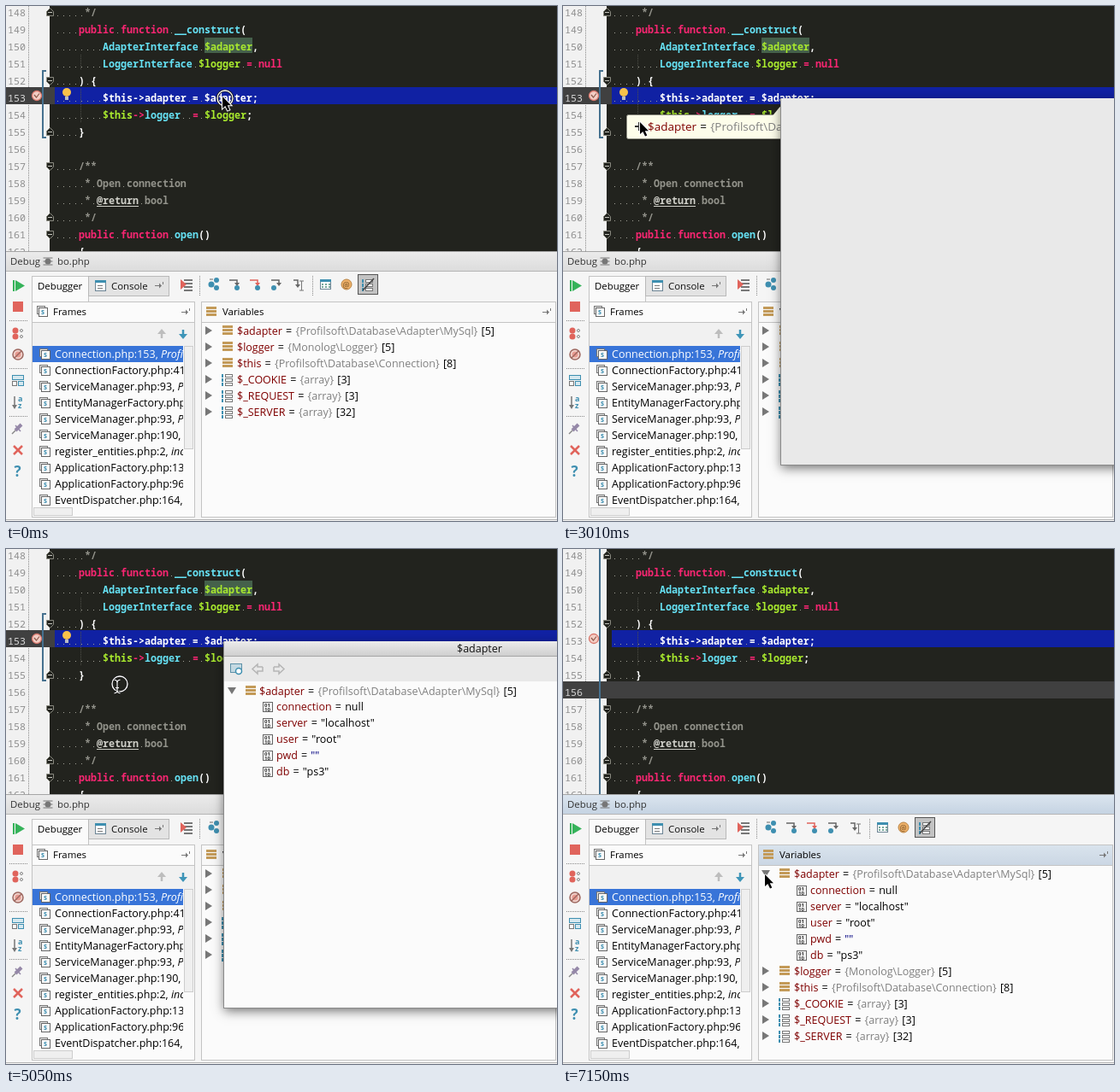
An HTML page with a canvas for the animation above (8000 ms loop, 644x603 px).

```html
<!DOCTYPE html>
<html lang="en">
<head>
<meta charset="utf-8">
<title>Debugger session</title>
<style>
html, body { margin: 0; width: 100%; height: 100%; overflow: hidden; background: #f5f5f5; }
canvas { display: block; }
</style>
</head>
<body>
<canvas id="stage" width="644" height="603"></canvas>
<script>
const g = document.getElementById('stage').getContext('2d');
const LOOP = 8000;
const MONO = '600 11.67px "Noto Sans Mono", "DejaVu Sans Mono", monospace';
const GUTTER = '11.67px "Noto Sans Mono", "DejaVu Sans Mono", monospace';
const ui = (size, style = '') => `${style} ${size}px "Open Sans", "Noto Sans", sans-serif`;
const LABEL = ui(11.4), LIST = ui(12.5);
const INK = { p: '#f92672', c: '#66e2f5', g: '#a9ea2e', w: '#ffffff', d: '#93938b', u: '#d0d0c9' };
const NAME = '#7f0000', GRAY = '#808080', BLUE = '#3e8fb0', RED = '#e0645c', EDGE = '#c4c4c4';

// Tokens are split by "|"; the first letter picks the ink.
const FIRST_LINE = 148;
const CODE = [
  'd     */',
  'p    public function |c__construct|w(',
  'c        AdapterInterface |g$adapter|w,',
  'c        LoggerInterface |g$logger |p= null',
  'w    ) {',
  'w        $this->adapter = $adapter;',
  'g        $this|p->|clogger  |p= |g$logger|w;',
  'w    }',
  '',
  'd    /**',
  'd     * Open connection',
  'd     * |u@return|d bool',
  'd     */',
  'p    public function |copen|w()',
  'w    {',
];
const FRAMES = [
  ['Connection.php:153, ', 'Profilsoft'], ['ConnectionFactory.php:41, ', 'Prof'],
  ['ServiceManager.php:93, ', 'Profilsoft'], ['EntityManagerFactory.php:24', ''],
  ['ServiceManager.php:93, ', 'Profilsoft'], ['ServiceManager.php:190, ', 'Prof'],
  ['register_entities.php:2, ', 'include'], ['ApplicationFactory.php:134', ''],
  ['ApplicationFactory.php:96', ''], ['EventDispatcher.php:164, ', 'Prof'],
];
const ADAPTER = ['$adapter', '{Profilsoft\\Database\\Adapter\\MySql}', '[5]'];
const VARIABLES = [
  ADAPTER, ['$logger', '{Monolog\\Logger}', '[5]'], ['$this', '{Profilsoft\\Database\\Connection}', '[8]'],
  ['$_COOKIE', '{array}', '[3]'], ['$_REQUEST', '{array}', '[3]'], ['$_SERVER', '{array}', '[32]'],
];
const FIELDS = [['connection', 'null'], ['server', '"localhost"'], ['user', '"root"'], ['pwd', '""'], ['db', '"ps3"']];

// Pointer path: time, x, y
const PATH = [
  [0, 253, 106], [1090, 253, 106], [1200, 245, 109], [1430, 191, 137], [1700, 125, 146], [1950, 101, 145],
  [2010, 100, 144], [2540, 90, 136], [4630, 90, 136], [4690, 114, 148], [4810, 130, 156], [5290, 130, 156],
  [5470, 199, 218], [5650, 244, 284], [5830, 256, 308], [6010, 256, 308], [6350, 252, 342], [6790, 236, 381], [LOOP, 236, 381],
];
const CLICKS = [[0, 60], [2840, 2960], [5050, 5110], [6910, 7090]];

function rect(x, y, w, h, fill) { g.fillStyle = fill; g.fillRect(x, y, w, h); }
function box(x, y, w, h, fill, edge) {
  rect(x, y, w, h, fill);
  g.strokeStyle = edge; g.lineWidth = 1;
  g.strokeRect(x + .5, y + .5, w - 1, h - 1);
}
function trace(pts) {
  g.beginPath();
  for (let i = 0; i < pts.length; i += 2) g.lineTo(pts[i], pts[i + 1]);
}
function poly(fill, ...pts) { trace(pts); g.fillStyle = fill; g.fill(); }
function line(color, width, ...pts) { trace(pts); g.strokeStyle = color; g.lineWidth = width; g.stroke(); }
function disc(x, y, r, fill, edge, width = 1.5) {
  g.beginPath(); g.arc(x, y, r, 0, 7);
  if (fill) { g.fillStyle = fill; g.fill(); }
  if (edge) { g.strokeStyle = edge; g.lineWidth = width; g.stroke(); }
}
function text(str, x, y, color, font = LABEL) {
  g.font = font; g.fillStyle = color; g.fillText(str, x, y);
  return x + g.measureText(str).width;
}
function gradient(y, h, top, bottom) {
  const fill = g.createLinearGradient(0, y, 0, y + h);
  fill.addColorStop(0, top); fill.addColorStop(1, bottom);
  return fill;
}
function dots(x, y, n, dx, dy) { for (let i = 0; i < n; i++) rect(x + i * dx, y + i * dy, 1, 1, '#8a8a8a'); }
const rowTop = n => 95 + 20 * (n - 153);

function drawCode(n, source) {
  const y = rowTop(n) + 17;
  let x = 57;
  for (const token of source.split('|')) {
    const str = token.slice(1);
    text(str, x, y, INK[token[0]], MONO);
    if (token[0] === 'u') rect(x, y + 2, 7 * str.length, 1, INK.u);
    for (const ch of str) {
      if (ch === ' ') rect(x + 3, y - 1, 1, 1, '#a0a096');
      x += 7;
    }
  }
}

function drawFold(n, up) {
  const y = rowTop(n) + 12.5, s = up ? -1 : 1;
  const pts = [47.5, y - 4 * s, 55.5, y - 4 * s, 55.5, y + 1 * s, 51.5, y + 5 * s, 47.5, y + 1 * s, 47.5, y - 4 * s];
  poly('#22231e', ...pts); line('#8a8a80', 1, ...pts);
  rect(49, y - .5, 5, 1, '#c4c4bc');
}

function drawEditor(t) {
  const moved = t >= 5110, current = moved ? 156 : 153;
  g.save();
  g.beginPath(); g.rect(0, 0, 644, 287); g.clip();
  rect(0, 0, 644, 287, '#22231e');
  rect(0, 0, 51, 287, '#f1f1f1');
  dots(26, 0, 144, 0, 2);
  rect(0, rowTop(current), moved ? 644 : 57, 20, '#404040');
  rect(57, rowTop(153), 587, 20, '#1021a3');
  if (t < 5350) rect(232, 37, 56, 18, '#45614b');
  for (let y = 57; y < 137; y += 2) if (y < 75 || y > 95) rect(87, y, 1, 1, '#4e4f48');
  CODE.forEach((source, i) => {
    const n = FIRST_LINE + i;
    text(n, 2, rowTop(n) + 17, n === current ? '#d8d8d8' : '#8e8e8e', GUTTER);
    drawCode(n, source);
  });
  const scope = '#46718f';
  if (t >= 5350) rect(42, 0, 2, 287, scope);
  else if (!moved) line(scope, 2, 47, 76, 43, 76, 43, 154, 47, 154);
  for (const n of [148, 155, 160]) drawFold(n, true);
  for (const n of [152, 157, 161]) drawFold(n, false);
  disc(36, 105, 5.5, '#f3cdc4', '#d9776c', 1.3);
  line('#8d5a4c', 1.2, 33, 104, 35.5, 107, 39, 102.5);
  if (!moved) {
    disc(71, 101, 5, '#f8c24a');
    rect(69, 106, 4, 4, '#b9bcc4');
  }
  const caretOn = moved
    ? t < 6970 && Math.floor((t - 5110) / 500) % 2 === 0
    : t >= 420 && t < 2930 && Math.floor((t - 420) / 500) % 2 === 0;
  if (caretOn) rect(moved ? 57 : 253, rowTop(current), 2, 20, '#f6ec52');
  g.restore();
}

function barsIcon(x, y) { for (let i = 0; i < 3; i++) rect(x, y - 6 + 4 * i, 12, 3, '#c39a58'); }
function arrayIcon(x, y) {
  for (let i = 0; i < 3; i++) {
    rect(x, y - 6 + 5 * i, 2, 4, BLUE);
    box(x + 4, y - 6 + 5 * i, 9, 4, '#fff', '#777');
  }
}
function valueIcon(x, y) {
  box(x, y - 6, 12, 12, '#f4f4f4', '#666');
  text('01', x + 2, y - .5, '#333', ui(6, 'bold'));
  text('10', x + 2, y + 4.5, '#333', ui(6, 'bold'));
}
function frameIcon(x, y) {
  box(x, y - 6, 10, 10, '#e8e8e8', '#777');
  box(x + 2, y - 4, 11, 11, '#fbfbfb', '#666');
  text('s', x + 5, y + 4, BLUE, ui(8, 'bold'));
}
function twisty(x, y, open) {
  if (open) poly('#777', x - 5, y - 4, x + 5, y - 4, x, y + 4);
  else poly('#777', x - 4, y - 5, x + 4, y, x - 4, y + 5);
}
function pinArrow(x, y) {
  line('#777', 1, x - 5, y + .5, x + 2, y + .5); poly('#777', x, y - 2.5, x + 3, y + .5, x, y + 3.5);
  rect(x + 4, y - 4, 1, 3, '#777');
}
function arrow(x, y, color, dx, dy) {
  line(color, 2.5, x - 5 * dx, y - 5 * dy, x + 3 * dx, y + 3 * dy);
  poly(color, x + 6 * dx, y + 6 * dy, x - 5 * dy, y - 5 * dx, x + 5 * dy, y + 5 * dx);
}

const GAP = 4.2;
function variableText([name, type, count], x, y, font = LIST) {
  x = text(name, x, y, NAME, font) + GAP;
  x = text('=', x, y, '#000', font) + GAP;
  x = text(type, x, y, GRAY, font) + GAP;
  text(count, x, y, '#000', font);
}
function drawFields(x, y) {
  FIELDS.forEach(([name, value], i) => {
    const cy = y + 19 * i;
    valueIcon(x, cy);
    const equals = text(name, x + 16, cy + 4, NAME, LIST) + GAP;
    const end = text('=', equals, cy + 4, '#000', LIST) + GAP;
    text(value, end, cy + 4, value === '""' ? '#000080' : '#000', LIST);
  });
}

function drawSidebar() {
  rect(8, 321, 2, 13, '#36b35a');
  poly('#36b35a', 11, 321, 22, 327.5, 11, 334);
  rect(8, 346, 12, 12, RED);
  disc(11, 380, 3.5, RED); disc(11, 387, 3.5, RED);
  disc(18, 380, 1.5, null, '#888', 1); disc(18, 387, 1.5, null, '#888', 1);
  disc(14, 408, 6, '#f0d5cf', '#9d675f'); disc(14, 408, 3.5, '#e79a90');
  line('#9d675f', 1.5, 10, 412, 18, 404);
  box(7, 432, 14, 6, '#d6e8ef', BLUE); box(7, 439, 6, 6, '#fff', '#777'); box(14, 439, 7, 6, '#d6e8ef', BLUE);
  line('#777', 1.5, 10, 457, 10, 470); poly('#777', 7, 467, 13, 467, 10, 472);
  text('a', 14, 463, BLUE, ui(9, 'bold')); text('z', 14, 471, BLUE, ui(9, 'bold'));
  line('#9588a8', 4, 11, 497, 18, 490); line('#9588a8', 1.5, 11, 491, 17, 498); line('#888', 1.5, 7, 501, 11, 497);
  line(RED, 2.5, 9, 515, 19, 525); line(RED, 2.5, 19, 515, 9, 525);
  text('?', 9.5, 551, BLUE, ui(17, 'bold'));
  for (const y of [368, 424, 480]) dots(4, y, 11, 2, 0);
}

function drawToolbar() {
  box(30, 316, 67, 31, '#fafafa', EDGE);
  text('Debugger', 37, 332, '#000');
  box(96, 316, 95, 24, '#e3e3e3', '#b9b9b9');
  box(104, 321, 13, 13, '#fff', '#6c8494'); rect(104, 321, 13, 3, BLUE);
  rect(107, 327, 6, 1, '#777'); rect(107, 330, 6, 1, '#777');
  text('Console', 123, 332, '#111'); pinArrow(179, 327);
  for (let i = 0; i < 4; i++) rect(208, 320 + 4 * i, 10, 2, '#777');
  poly(RED, 204, 320, 211, 326, 204, 332);
  dots(226, 316, 12, 0, 2); dots(358, 316, 12, 0, 2);
  disc(240, 326, 3.5, BLUE); disc(246, 321, 3, BLUE); disc(246, 330, 3, BLUE);
  line('#666', 1, 238, 320, 242, 320);
  [[267, BLUE], [291, RED], [316, BLUE]].forEach(([x, color], i) => {
    const ink = color === RED ? RED : '#666';
    line(ink, 1.5, x - 6, 321, x + 3, 321, x + 3, 325);
    poly(ink, x, 324, x + 6, 324, x + 3, 328);
    disc(x + (i === 2 ? -3 : 3), 330, 3, BLUE);
  });
  line('#666', 1.5, 336, 321, 341, 321, 341, 328); poly('#666', 338, 326, 344, 326, 341, 330);
  line('#777', 1, 343, 322, 348, 322); line('#777', 1, 345.5, 322, 345.5, 333); line('#777', 1, 343, 333, 348, 333);
  box(367, 320, 13, 12, '#fff', '#6c8494'); rect(367, 320, 13, 3, BLUE);
  for (const y of [325, 328]) for (const x of [369, 373, 377]) rect(x, y, 2, 2, '#78a89b');
  disc(398, 326, 6, '#edb069', '#b98342', 1); text('@', 393.5, 329.5, '#704a1d', ui(9));
  box(411, 314, 24, 24, '#c3c3c3', '#555');
  arrayIcon(416, 326); line('#444', 1.5, 417, 333, 430, 319);
}

function drawPanels(t) {
  const focused = t >= 6970, expanded = t >= 7030;
  rect(0, 287, 644, 316, '#f5f5f5');
  rect(0, 287, 644, 1, '#a5a5a5');
  rect(0, 288, 644, 22, focused ? gradient(288, 22, '#dbe5ef', '#c5d3e2') : gradient(288, 22, '#ebebeb', '#dcdcdc'));
  rect(0, 310, 644, 1, '#b5b5b5');
  text('Debug', 5, 303, '#333');
  disc(49, 299, 3.5, '#777');
  for (const dy of [-4, 0, 4]) line('#777', 1, 43.5, 299 + dy, 54.5, 299 + dy);
  text('bo.php', 60, 303, '#333');
  drawSidebar();
  drawToolbar();

  box(30, 346, 191, 253, '#fbfbfb', EDGE);
  rect(31, 370, 189, 28, '#f1f1f1'); rect(31, 370, 189, 1, EDGE);
  frameIcon(36, 357); text('Frames', 55, 362, '#000'); pinArrow(210, 358);
  arrow(182, 384, '#bdbdbd', 0, -1); arrow(207, 384, '#3e95b8', 0, 1);
  g.save();
  g.beginPath(); g.rect(31, 398, 176, 188); g.clip();
  rect(31, 398, 176, 19, '#3874d8');
  FRAMES.forEach(([file, path], i) => {
    const y = 407 + 19 * i, color = i ? '#000' : '#fff';
    frameIcon(39, y);
    text(path, text(file, 57, y + 4.5, color, LIST), y + 4.5, color, ui(12.5, 'italic'));
  });
  g.restore();
  box(208, 398, 11, 121, '#efefef', '#cdcdcd');
  box(32, 587, 46, 10, '#efefef', '#cdcdcd');

  box(228, 346, 415, 253, '#fbfbfb', EDGE);
  rect(229, 347, 413, 23, focused ? gradient(347, 23, '#d9e3ed', '#cbd7e4') : '#f8f8f8');
  rect(229, 370, 413, 1, EDGE);
  barsIcon(234, 358); text('Variables', 253, 362, '#000'); pinArrow(632, 358);
  VARIABLES.forEach((variable, i) => {
    const y = 380 + 19 * (i + (expanded && i ? FIELDS.length : 0));
    twisty(237, y, expanded && !i);
    (i < 3 ? barsIcon : arrayIcon)(i < 3 ? 253 : 252, y);
    variableText(variable, 270, y + 4.5);
  });
  if (expanded) drawFields(273, 400);
  rect(0, 601, 644, 1, '#b5b5b5');
}

function drawTooltip(t) {
  if (t < 320 || t >= 3070) return;
  g.save();
  g.globalAlpha = Math.min(1, (Math.floor((t - 320) / 60) + 1) / 3);
  g.beginPath(); g.roundRect(74.5, 127.5, 357, 28, 2);
  g.shadowColor = 'rgba(0,0,0,.5)'; g.shadowBlur = 3;
  g.fillStyle = '#fdfdea'; g.fill();
  g.shadowColor = 'transparent';
  g.strokeStyle = '#8f8f84'; g.lineWidth = 1; g.stroke();
  poly('#fdfdea', 245, 128.5, 253.5, 118, 262, 128.5);
  rect(84, 140, 10, 2, '#333'); rect(88, 136, 2, 10, '#333');
  variableText(ADAPTER, 99, 146, ui(13.5));
  g.restore();
}

function drawPopup(t) {
  if (t < 2960 || t >= 5110) return;
  g.save();
  g.shadowColor = 'rgba(0,0,0,.55)'; g.shadowBlur = 12; g.shadowOffsetY = 4;
  rect(255, 108, 400, 429, '#e9e9e9');
  g.restore();
  if (t >= 3130) {
    rect(255, 108, 389, 17, gradient(108, 17, '#ececec', '#cfcfcf'));
    rect(255, 125, 389, 1, '#a5a5a5');
    text('$adapter', 527, 121, '#111', ui(12.5));
    box(262, 134, 14, 11, '#c4d9e2', '#5d91a8'); disc(272, 143, 3.5, '#fff', BLUE);
    for (const [x, s] of [[294, -1], [319, 1]])
      line('#b5b5b5', 1.5, x - 6 * s, 138, x, 138, x, 135, x + 6 * s, 140.5, x, 146, x, 143, x - 6 * s, 143, x - 6 * s, 138);
    rect(255, 155, 389, 382, '#fbfbfb');
    twisty(264, 166, true); barsIcon(280, 166);
    variableText(ADAPTER, 296, 170.5);
    drawFields(300, 185);
  }
  rect(254, 108, 1, 429, '#8a8a8a'); rect(254, 537, 390, 1, '#8a8a8a');
}

function drawPointer(t) {
  const next = PATH.findIndex(p => p[0] > t), a = PATH[next - 1], b = PATH[next];
  const k = (t - a[0]) / (b[0] - a[0]);
  const x = a[1] + (b[1] - a[1]) * k, y = a[2] + (b[2] - a[2]) * k;
  if (CLICKS.some(([from, to]) => t >= from && t < to)) {
    disc(x + 3, y + 2, 9, null, '#222', 3);
    disc(x + 3, y + 2, 9, null, '#fff', 1.3);
  }
  g.save();
  g.translate(x, y);
  if (t >= 3070 && y < 287) {
    const stem = [[-3.5, -3, -1, -2, 0, -.5, 1, -2, 3.5, -3], [0, -1, 0, 11], [-3.5, 13, -1, 12, 0, 10.5, 1, 12, 3.5, 13], [-2, 6.5, 2, 6.5]];
    for (const pts of stem) line('#111', 2.5, ...pts);
    for (const pts of stem) line('#fff', 1.2, ...pts);
  } else {
    const pts = [0, 0, 0, 14, 3.3, 11, 6, 16.5, 8.3, 15.5, 5.8, 10.2, 10, 10.2, 0, 0];
    line('#fff', 2, ...pts);
    poly('#000', ...pts);
  }
  g.restore();
}

function render(now) {
  const t = now % LOOP;
  drawEditor(t);
  drawPanels(t);
  drawTooltip(t);
  drawPopup(t);
  drawPointer(t);
}

const start = performance.now();
function tick() {
  render(performance.now() - start);
  requestAnimationFrame(tick);
}
tick();
</script>
</body>
</html>
```
